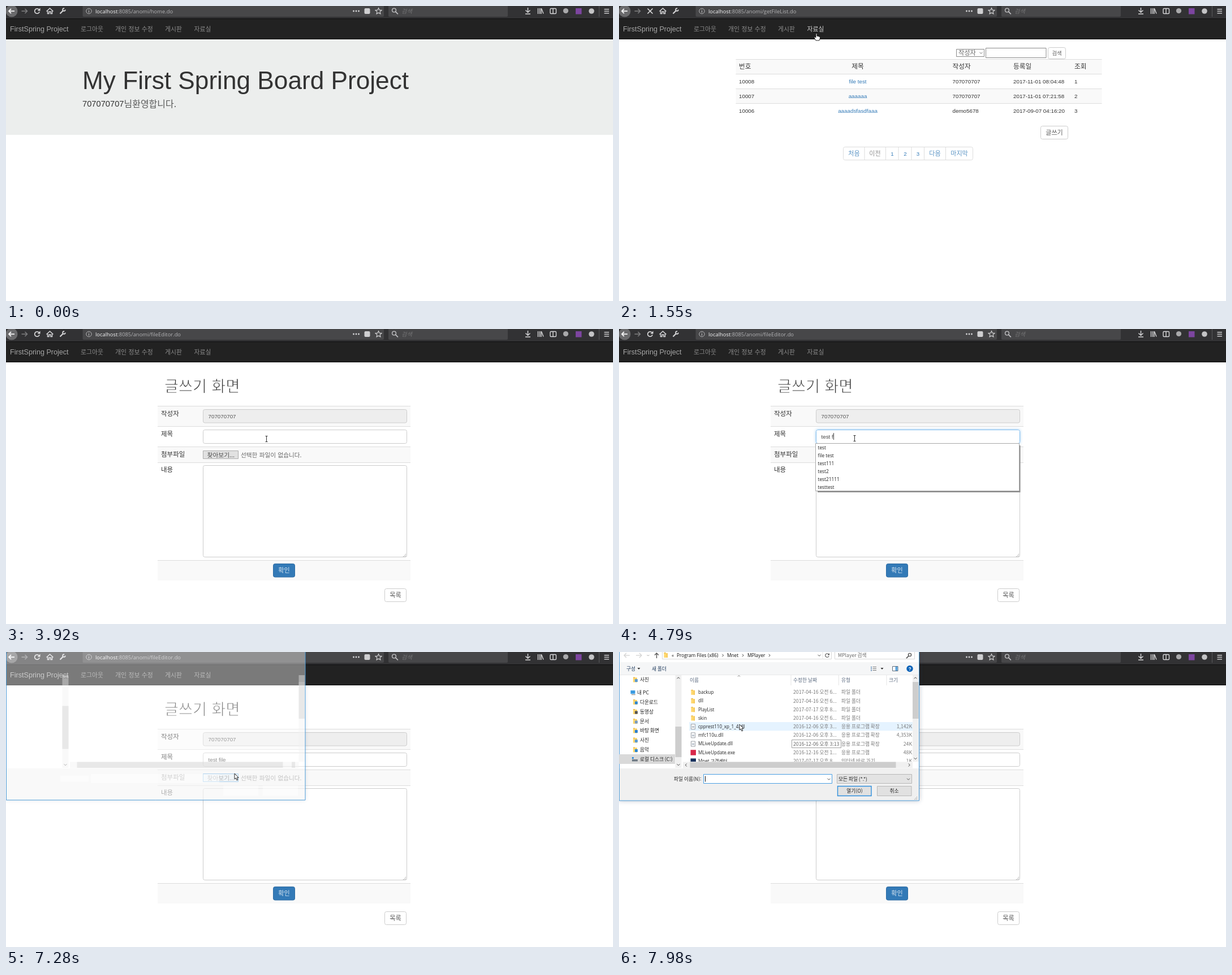
Animation of 1073 by 522 pixels, one loop 8 s. Source, as an HTML page with a canvas:

```html
<!DOCTYPE html>
<html lang="ko">
<head>
<meta charset="utf-8">
<title>Board demo</title>
<style>
html, body { margin: 0; width: 100%; height: 100%; overflow: hidden; background: #fff; }
canvas { display: block; }
</style>
</head>
<body>
<canvas id="stage" width="1073" height="522"></canvas>
<script>
const ctx = document.getElementById('stage').getContext('2d');
const LOOP = 8000;
const SANS = '"Liberation Sans", Arial, sans-serif';
const UI = '"Open Sans", "Noto Sans", sans-serif';
const KO = '"Noto Sans CJK KR", "Noto Sans CJK", sans-serif';
const USER = '707070707';

// y is the middle of the capital letters
function text(s, x, y, size, color, { font = SANS, weight = 400, align = 'left', style = 'normal' } = {}) {
  ctx.font = `${style} ${weight} ${size}px ${font}`;
  ctx.textAlign = align;
  ctx.fillStyle = color;
  ctx.fillText(s, x, Math.round(y + size * 0.36));
  return ctx.measureText(s).width;
}

// pitch is the advance of one Hangul syllable; thin is the background that trims the strokes
function ko(s, x, y, pitch, color, { thin, ...opt } = {}) {
  const size = pitch / 0.92;
  ctx.save();
  ctx.wordSpacing = pitch * 0.1 + 'px';
  if (!opt.weight && !thin) ctx.globalAlpha *= 0.8;
  text(s, x, y, size, color, { font: KO, weight: 300, ...opt });
  if (thin) {
    ctx.strokeStyle = thin;
    ctx.lineWidth = size * 0.03;
    ctx.strokeText(s, x, Math.round(y + size * 0.36));
  }
  ctx.restore();
}

const dlgText = (s, x, y, color = '#222', align = 'left') =>
  text(s, x, y, 8.7, color, { font: KO, align });

function rect(x, y, w, h, color) {
  ctx.fillStyle = color;
  ctx.fillRect(x, y, w, h);
}

function box(x, y, w, h, fill, stroke, r = 0, lw = 1) {
  ctx.beginPath();
  ctx.roundRect(x, y, w, h, r);
  if (fill) { ctx.fillStyle = fill; ctx.fill(); }
  if (stroke) { ctx.strokeStyle = stroke; ctx.lineWidth = lw; ctx.stroke(); }
}

function disc(x, y, r, color) {
  ctx.beginPath();
  ctx.arc(x, y, r, 0, 7);
  ctx.fillStyle = color;
  ctx.fill();
}

function ring(x, y, r, color, lw = 1.3, from = 0, to = Math.PI * 2) {
  ctx.beginPath();
  ctx.arc(x, y, r, from, to);
  ctx.strokeStyle = color;
  ctx.lineWidth = lw;
  ctx.stroke();
}

function line(color, lw, ...pts) {
  ctx.beginPath();
  for (let i = 0; i < pts.length; i += 2) ctx.lineTo(pts[i], pts[i + 1]);
  ctx.strokeStyle = color;
  ctx.lineWidth = lw;
  ctx.stroke();
}

function poly(fill, ...pts) {
  ctx.beginPath();
  for (let i = 0; i < pts.length; i += 2) ctx.lineTo(pts[i], pts[i + 1]);
  ctx.closePath();
  ctx.fillStyle = fill;
  ctx.fill();
}

const chevron = (x, y, d, color, s = 2.5) =>
  line(color, 1, x - s, y - d * s / 2, x, y + d * s / 2, x + s, y - d * s / 2);
const sideChevron = (x, y, d, color, s = 2.5) =>
  line(color, 1, x - d * s / 2, y - s, x + d * s / 2, y, x - d * s / 2, y + s);

function arrow(x, y, d, color, lw = 1.6) {
  line(color, lw, x - 5 * d, y, x + 5 * d, y);
  line(color, lw, x + d, y - 4, x + 5 * d, y, x + d, y + 4);
}

function lens(x, y, r, color, d = 1) {
  ring(x, y, r, color, 1.4);
  line(color, 1.6, x + d * r * 0.7, y + r * 0.7, x + d * (r + 3.5), y + r + 3.5);
}

function loadIcon(t) {
  const c = '#dededf';
  const half = (t >= 1080 && t < 1150) || (t >= 2990 && t < 3150);
  const cross = (t >= 1150 && t < 1780) || (t >= 3150 && t < 3690);
  if (half) return line(c, 1.3, 51, 5, 59, 13);
  if (cross) {
    line(c, 1.6, 50.5, 4.5, 59.5, 13.5);
    line(c, 1.6, 59.5, 4.5, 50.5, 13.5);
    return;
  }
  ring(55, 9, 4.3, c, 1.6, 0.3, 5.5);
  poly(c, 60.5, 3.5, 60.5, 8.5, 55.5, 8.5);
}

function browserBar(t) {
  const c = '#d7d7d9';
  rect(0, 0, 1073, 23, '#323234');
  rect(0, 22, 1073, 1, '#0f0f10');
  box(135.5, -4, 532.5, 23, '#474749', null, 2);
  box(676, -4, 211, 23, '#474749', null, 2);

  disc(10, 9, 10.5, '#6a6a6c');
  arrow(10, 9, -1, '#f2f2f3', 1.8);
  arrow(32.5, 9, 1, '#7c7c7e');
  loadIcon(t);
  line(c, 1.6, 71.5, 9.5, 77.5, 4, 83.5, 9.5);
  line(c, 1.5, 73.5, 8.5, 73.5, 13.5, 76, 13.5, 76, 10, 79, 10, 79, 13.5, 81.5, 13.5, 81.5, 8.5);
  line(c, 2.2, 95.5, 13.5, 101, 8);
  ring(102.5, 6.5, 2.3, c, 1.8, 0, 5);

  ring(146.5, 9, 4.7, '#b6b6b8', 1);
  rect(146, 8, 1, 4, '#c4c4c6');
  rect(146, 6, 1, 1, '#c4c4c6');
  const page = t < 1230 ? 'home' : t < 2920 ? 'getFileList' : 'fileEditor';
  const w = text('localhost', 158, 9.5, 9.4, '#f6f6f7', { font: UI });
  text(`:8085/anomi/${page}.do`, 158 + w, 9.5, 9.4, '#b3b3b5', { font: UI });

  for (const x of [614.5, 619, 623.5]) disc(x, 9, 1.4, c);
  box(633.5, 4, 10, 10, '#cfcfd1', null, 2);
  ctx.beginPath();
  for (let i = 0; i < 10; i++) {
    const a = -Math.PI / 2 + i * Math.PI / 5, r = i % 2 ? 2.7 : 5.8;
    ctx.lineTo(658.5 + r * Math.cos(a), 9.3 + r * Math.sin(a));
  }
  ctx.closePath();
  ctx.strokeStyle = c;
  ctx.lineWidth = 1.1;
  ctx.stroke();
  lens(686, 7.5, 3.4, '#c2c2c4');
  ko('검색', 699, 9.5, 9.4, '#7f7f81', { style: 'italic' });

  line(c, 1.5, 922.5, 3, 922.5, 11);
  line(c, 1.5, 918.5, 7.5, 922.5, 11.3, 926.5, 7.5);
  line(c, 1.5, 918, 14, 927, 14);
  for (const x of [940.5, 943.5, 946]) line(c, 1.4, x, 4, x, 14);
  line(c, 1.4, 946.5, 4.5, 950, 13.5);
  box(962, 4.5, 10.5, 9, null, c, 1.5, 1.4);
  line(c, 1.4, 967, 5, 967, 13);
  disc(989.5, 8.5, 4.6, '#a9a9ab');
  rect(1007, 4, 10.5, 10.5, '#7d45a0');
  disc(1035, 9, 4.8, '#c4c4c6');
  rect(1048, 0, 1, 19, '#59595b');
  for (const y of [5, 8.5, 12]) rect(1057.5, y, 8.5, 1.4, c);
}

function navbar(t) {
  rect(0, 23, 1073, 36, '#222');
  rect(0, 58, 1073, 1, '#0a0a0a');
  const c = '#a6a6a6';
  text('FirstSpring Project', 7, 40.8, 12.6, '#a6a6a6');
  ko('로그아웃', 132, 41, 10, c);
  ko('개인 정보 수정', 193, 41, 10, c);
  ko('게시판', 281, 41, 10, c);
  ko('자료실', 332.5, 41, 10, t >= 720 && t < 1660 ? '#fff' : c);
}

function home() {
  rect(0, 59, 1073, 169, '#eceeed');
  text('My First Spring Board Project', 135, 131.3, 44.2, '#333');
  const w = text(USER, 135, 173, 14.7, '#333');
  ko('님환영합니다.', 135 + w, 173, 14.7, '#333');
}

function button(s, x, y, w, h, pitch, fill = '#fff', border = '#ccc', color = '#333') {
  box(x, y, w, h, fill, border, 3);
  ko(s, x + w / 2, y + h / 2, pitch, color, { align: 'center' });
}

function list(t) {
  const blue = '#337ab7', dark = '#333';
  box(596.5, 76.5, 49, 13, '#fff', '#8a8a8a');
  ko('작성자', 600, 83, 10.3, '#444');
  chevron(640, 83, 1, '#777');
  box(648.5, 74.5, 106.5, 17, '#fff', '#8a8a8a');
  button('검색', 758.5, 73.5, 31, 20, 8.6);

  rect(206.5, 95, 647, 26, '#f9f9f9');
  rect(206.5, 147, 647, 26, '#f9f9f9');
  for (let i = 0; i < 4; i++) rect(206.5, 94 + 26 * i, 647, 1, '#ddd');
  const head = { weight: 500 };
  ko('번호', 212, 107, 10.7, dark, head);
  ko('제목', 422, 107, 10.7, dark, { ...head, align: 'center' });
  ko('작성자', 589.5, 107, 10.7, dark, head);
  ko('등록일', 697, 107, 10.7, dark, head);
  ko('조회', 805, 107, 10.7, dark, head);
  const rows = [
    ['10008', 'file test', USER, '2017-11-01 08:04:48', '1'],
    ['10007', 'aaaaaa', USER, '2017-11-01 07:21:58', '2'],
    ['10006', 'aaaadsfasdfaaa', 'demo5678', '2017-09-07 04:16:20', '3']
  ];
  const over = t >= 2080 && t < 2260;
  rows.forEach(([id, title, user, date, hits], i) => {
    const y = 133 + 26 * i, lit = over && i === 0;
    text(id, 212, y, 9.8, dark);
    const w = text(title, 422, y, 9.8, lit ? '#23527c' : blue, { align: 'center' });
    if (lit) rect(422 - w / 2, y + 5, w, 1, '#23527c');
    text(user, 589.5, y, 9.8, dark);
    text(date, 697, y, 9.8, dark);
    text(hits, 805, y, 9.8, dark);
  });

  const held = t >= 2610 && t < 2690, hot = t >= 2420;
  button('글쓰기', 745.5, 212.5, 48, 23, 10.2,
    held ? '#d4d4d4' : hot ? '#e6e6e6' : '#fff', hot ? '#adadad' : '#ccc');

  box(396.5, 249.5, 229, 23, '#fff', '#ddd', 3);
  for (const x of [433.5, 471, 493.5, 516.5, 539, 577]) rect(x, 250, 1, 23, '#ddd');
  const mid = { align: 'center' };
  ko('처음', 415.5, 261.5, 10.2, blue, mid);
  ko('이전', 452.5, 261.5, 10.2, '#777', mid);
  [483, 506, 528.5].forEach((x, i) => text(String(i + 1), x, 261.5, 9.8, blue, mid));
  ko('다음', 558.5, 261.5, 10.2, blue, mid);
  ko('마지막', 601.5, 261.5, 10.2, blue, mid);
}

const keyTimes = [4150, 4230, 4310, 4390, 4540, 4790, 5400, 5720, 5780];

function field(t) {
  const focus = t >= 4000 && t < 6800;
  if (focus) {
    ctx.save();
    ctx.shadowColor = 'rgba(102,175,233,.6)';
    ctx.shadowBlur = 5;
    box(348, 178, 361, 24.5, '#fff', null, 3);
    ctx.restore();
  }
  box(348.5, 178.5, 360, 24, '#fff', focus ? '#7fbcee' : '#ccc', 3);
  const typed = 'test file'.slice(0, keyTimes.filter(k => t >= k).length);
  const w = text(typed, 357.5, 190, 9.8, '#444');
  const blink = t >= 5940 && t < 6320;
  if (focus && !blink) rect(Math.round(357.5 + w), 184, 1, 12, '#444');
}

function suggestions(t) {
  if (t < 4230 || t >= 6330) return;
  const all = ['test', 'file test', 'test111', 'test2', 'test21111', 'testtest'];
  const items = t < 4870 ? all : ['file test'];
  const h = items.length * 14 + 1;
  rect(351, 206, 358.5, h - 2, '#8c8c8c');
  box(347.5, 202.5, 360, h - 1, '#fff', '#a8a8a8');
  items.forEach((s, i) => text(s, 351.5, 210.5 + 14 * i, 8.3, '#222', { font: UI }));
}

function editor(t) {
  const dark = '#333', label = { weight: 500 };
  ko('글쓰기 화면', 280, 101, 25, dark, { thin: '#fff' });
  for (const [y, h] of [[137, 35], [208, 28], [409, 36]]) rect(268, y, 447, h, '#f9f9f9');
  for (const y of [136, 172, 208, 236, 409]) rect(268, y, 447, 1, '#ddd');
  ko('작성자', 274, 150, 10.6, dark, label);
  ko('제목', 274, 186, 10.6, dark, label);
  ko('첨부파일', 274, 221.5, 10.6, dark, label);
  ko('내용', 274, 249, 10.6, dark, label);
  box(348.5, 142.5, 360, 23.5, '#eee', '#ccc', 3);
  text(USER, 357.5, 154.5, 9.8, '#555');
  field(t);
  const hot = t >= 6470;
  box(348.5, 215.5, 62, 14, hot ? '#e5f1fb' : '#e1e1e1', hot ? '#2f8fdd' : '#adadad');
  ko('찾아보기...', 355.5, 223, 9.9, '#222');
  ko('선택한 파일이 없습니다.', 415, 223, 9.8, '#444');
  box(348.5, 241.5, 360, 162, '#fff', '#ccc', 3);
  grip(707, 402);
  button('확인', 472.5, 415.5, 38, 23.5, 10.2, '#337ab7', '#2e6da4', '#fff');
  button('목록', 669.5, 459.5, 38, 23, 10.2);
  suggestions(t);
}

function grip(x, y) {
  for (let i = 0; i < 3; i++)
    for (let j = 0; j <= i; j++) rect(x - 5 + i * 2, y - j * 2, 1, 1, '#999');
}

function dialogFrame(w, h, alpha) {
  ctx.save();
  ctx.globalAlpha = alpha;
  ctx.save();
  ctx.beginPath();
  ctx.rect(0, 0, 1073, 522);
  ctx.rect(0, 0, w, h);
  ctx.clip('evenodd');
  ctx.shadowColor = 'rgba(20,40,80,.3)';
  ctx.shadowBlur = 8;
  rect(0, 0, w, h, '#fff');
  ctx.restore();
  rect(0, 0, w, h, '#fff');
  rect(0, 206, w, h - 206, '#f0f0f0');
  ctx.restore();
  box(0.5, -2, w - 0.5, h + 2, null, '#4f9dd8');
}

function scrollBars(sideY, sideH, shift) {
  rect(99.5, 41, 11, 164, '#f0f0f0');
  rect(99.5, sideY, 11, sideH, '#cdcdcd');
  chevron(105, 46, -1, '#444');
  chevron(105, 199.5, 1, '#444');
  rect(519 - shift, 41, 10.5, 153, '#f0f0f0');
  rect(519 - shift, 53, 10.5, 65, '#cdcdcd');
  rect(113, 194.5, 406 - shift, 11, '#f0f0f0');
  rect(125.5, 194.5, 364, 10.5, '#cdcdcd');
}

function blankDialog(alpha) {
  dialogFrame(529, 262, alpha);
  ctx.save();
  ctx.globalAlpha = alpha;
  scrollBars(95.5, 76, 1.5);
  rect(505, 194.5, 6, 10.5, '#cdcdcd');
  for (const [x, y, w, h] of [[96, 218.5, 50, 11], [150, 216, 227, 16], [384, 236.5, 62, 18], [454, 236.5, 62, 18]])
    rect(x, y, w, h, '#fff');
  ctx.restore();
}

function folder(x, y) {
  rect(x - 3, y - 4.5, 3.5, 2, '#e3b23f');
  rect(x - 3, y - 3.5, 6.5, 8, '#ffd76e');
  rect(x + 2, y - 3.5, 1.5, 8, '#f2c14e');
}

function sheet(x, y, mark) {
  box(x - 3.5, y - 4.5, 7, 9, '#fff', '#8f959c', 0, 0.9);
  rect(x - 2, y - 1, 4, 3, mark);
}

function sidePane() {
  rect(0, 181, 99, 17, '#d9d9d9');
  const items = [['사진', 49], ['다운로드', 88.5], ['동영상', 105.5], ['문서', 122.5],
    ['바탕 화면', 139], ['사진', 156], ['음악', 173]];
  const tint = ['#5c9bd1', '#2f87d0', '#555', '#7a9cc0', '#2c7fd0', '#5c9bd1', '#2f87d0'];
  items.forEach(([s, y], i) => {
    folder(28, y);
    rect(28, y - 1, 5, 5, tint[i]);
    dlgText(s, 37, y);
  });
  rect(20.5, 68, 8, 6, '#3b9be0');
  rect(22, 75, 7, 1, '#777');
  dlgText('내 PC', 32, 72);
  rect(23, 190, 10, 3.5, '#6f7a84');
  rect(23, 186, 3, 3, '#2a8ad8');
  dlgText('로컬 디스크 (C:)', 37, 190);
}

function fileRows() {
  const gray = '#7a7a7a', lib = '응용 프로그램 확장', dir = '파일 폴더';
  const files = [
    ['backup', '2017-04-16 오전 6...', dir],
    ['dll', '2017-04-16 오전 6...', dir],
    ['PlayList', '2017-07-17 오후 8...', dir],
    ['skin', '2017-04-16 오전 6...', dir],
    ['cpprest110_xp_1_4.dll', '2016-12-06 오후 3...', lib, '1,142K'],
    ['mfc110u.dll', '2016-12-06 오후 3...', lib, '4,353K'],
    ['MLiveUpdate.dll', '2016-12-06 오후 3...', lib, '24K'],
    ['MLiveUpdate.exe', '2016-12-16 오전 1...', '응용 프로그램', '48K'],
    ['Mnet 고객센터', '2017-07-17 오후 8...', '인터넷 바로 가기', '1K']
  ];
  ctx.save();
  ctx.beginPath();
  ctx.rect(113, 60, 406, 134);
  ctx.clip();
  files.forEach(([name, date, kind, size], i) => {
    const y = 71.3 + 15.2 * i;
    if (i < 4) folder(130.5, y);
    else if (i < 7) sheet(131, y, '#b9c2cc');
    else rect(126.5, y - 4.5, 9.5, 9.5, i === 7 ? '#d8284a' : '#17305c');
    text(name, 140, y, 8.1, '#222', { font: `"Open Sans", ${KO}` });
    dlgText(date, 308, y, gray);
    dlgText(kind, 393, y, gray);
    if (size) dlgText(size, 518, y, gray, 'right');
  });
  ctx.restore();
}

function dialog(t) {
  const gray = '#5c6b80';
  dialogFrame(530.5, 263, 1);
  arrow(14, 6, -1, '#d0d0d0', 1.2);
  arrow(35, 6, 1, '#d0d0d0', 1.2);
  chevron(51.5, 6, 1, '#aaa', 2);
  line('#555', 1.4, 66.5, 11, 66.5, 2);
  line('#555', 1.4, 63, 5.5, 66.5, 2, 70, 5.5);
  box(76.5, -4, 299, 16.5, '#fff', '#d9d9d9');
  rect(359.5, 0, 1, 13, '#e5e5e5');
  folder(82.5, 5.5);
  text('«', 93, 6, 8.3, '#333', { font: UI });
  text('Program Files (x86)', 102, 6, 8.3, '#111', { font: UI });
  text('Mnet', 191, 6, 8.3, '#111', { font: UI });
  text('MPlayer', 227, 6, 8.3, '#111', { font: UI });
  for (const x of [183.5, 219, 266]) sideChevron(x, 6, 1, '#444', 2.3);
  chevron(354, 6, 1, '#555');
  ring(368, 6, 3.3, '#555', 1.1, 0.4, 5.6);
  poly('#555', 372, 2, 372, 5.5, 368.5, 5.5);
  box(381.5, -4, 141, 16.5, '#fff', '#d9d9d9');
  dlgText('MPlayer 검색', 387, 6, '#666');
  lens(514, 5, 2.6, '#555', -1);

  rect(1, 18, 529, 22.5, '#f5f6f7');
  rect(1, 40, 529, 1, '#e8e9ea');
  dlgText('구성', 13, 29.5, '#1e395b');
  poly('#333', 32.5, 28, 37.5, 28, 35, 31);
  dlgText('새 폴더', 58, 29.5, '#1e395b');
  for (const y of [26, 29, 32]) {
    rect(445, y, 2, 1.5, '#4f7eae');
    rect(448.5, y, 6.5, 1, '#777');
  }
  poly('#333', 462.5, 28, 467.5, 28, 465, 31);
  box(483.5, 25.5, 9.5, 8, '#fff', '#5a6b7d');
  rect(488.5, 26, 4, 7, '#5aa4dc');
  disc(514, 29.5, 5.7, '#0a63b8');
  text('?', 514, 29.5, 8.5, '#fff', { weight: 700, align: 'center' });

  sidePane();
  scrollBars(132, 54, 0);
  chevron(524, 46, -1, '#444');
  chevron(524, 188.5, 1, '#444');
  sideChevron(118.5, 200, -1, '#444');
  sideChevron(513, 200, 1, '#444');
  chevron(212, 42.5, -1, '#777', 2);
  dlgText('이름', 125, 49.5, gray);
  dlgText('수정한 날짜', 308, 49.5, gray);
  dlgText('유형', 393, 49.5, gray);
  dlgText('크기', 477, 49.5, gray);
  for (const x of [303.5, 388, 472.5]) rect(x, 41, 1, 18, '#e5e5e5');
  if (t >= 7750) rect(124, t < 7830 ? 154.5 : 124, 395, 15.3, '#e5f3ff');
  fileRows();
  if (t >= 7830) {
    box(305.5, 155.5, 87, 14, '#fff', '#a0a0a0');
    dlgText('2016-12-06 오후 3:13', 308, 162.5, '#666');
  }

  dlgText('파일 이름(N):', 145.5, 224.5, '#222', 'right');
  box(149.5, 216.5, 227, 16, '#fff', '#4a9fe3');
  rect(152, 219.5, 1, 10, '#111');
  chevron(371, 225, 1, '#555');
  box(385.5, 216.5, 132, 16, '#e3e3e3', '#b8b8b8');
  dlgText('모든 파일 (*.*)', 388, 224.5);
  chevron(511.5, 225, 1, '#555');
  box(386.5, 237.5, 59.5, 17, '#e1e1e1', '#2f8fdd', 0, 1.4);
  dlgText('열기(O)', 416.5, 246, '#222', 'center');
  box(456.5, 237.5, 60.5, 17, '#e1e1e1', '#b8b8b8');
  dlgText('취소', 486.5, 246, '#222', 'center');
  grip(527, 260);
}

// time, x, y
const path = [
  [130, 899, 396], [420, 620, 215], [700, 356, 56], [760, 349, 48], [1620, 349, 48],
  [1900, 385, 95], [2150, 416, 127], [2230, 416, 127], [2440, 762, 221], [3150, 762, 221],
  [3600, 560, 196], [3690, 560, 196], [3920, 416, 193], [6170, 416, 193], [6470, 398, 227],
  [6720, 398, 227], [6860, 404, 215], [7510, 404, 215], [7720, 320, 165], [7890, 213, 128]
];

function pointAt(t) {
  const i = path.findIndex(k => k[0] > t);
  if (i < 0) return path[path.length - 1].slice(1);
  if (i === 0) return path[0].slice(1);
  const [a, x0, y0] = path[i - 1], [b, x1, y1] = path[i];
  const f = (t - a) / (b - a);
  return [x0 + (x1 - x0) * f, y0 + (y1 - y0) * f];
}

function pointer(t) {
  if (t < 130) return;
  const [x, y] = pointAt(Math.floor(t / 77) * 77);
  const within = (a, b) => t >= a && t < b;
  ctx.save();
  ctx.translate(Math.round(x), Math.round(y));
  ctx.lineJoin = 'round';
  if (within(3840, 6330)) {
    line('#333', 1, 0.5, -4, 0.5, 5);
    line('#333', 1, -1.5, -4.5, 2.5, -4.5);
    line('#333', 1, -1.5, 5.5, 2.5, 5.5);
  } else {
    const hand = within(720, 1660) || within(2080, 2260);
    const shape = new Path2D(hand
      ? 'M-1 1Q0-1 1 1V5L5 6Q7 7 6.5 9L5 13H-1L-4 8Q-4 6-2.5 7L-1 8Z'
      : 'M0 0V10L2.3 8L4 12L5.8 11.2L4.2 7.4H7.2Z');
    ctx.fillStyle = '#fff';
    ctx.fill(shape);
    ctx.strokeStyle = '#111';
    ctx.lineWidth = 0.9;
    ctx.stroke(shape);
  }
  ctx.restore();
}

function draw(t) {
  rect(0, 0, 1073, 522, '#fff');
  browserBar(t);
  navbar(t);
  if (t < 1380) home();
  else if (t < 3230) list(t);
  else editor(t);
  if (t >= 7590) dialog(t);
  else if (t >= 7280) blankDialog(t < 7360 ? 0.4 : t < 7430 ? 0.66 : t < 7510 ? 0.84 : 1);
  pointer(t);
}

const start = performance.now();
function tick() {
  draw((performance.now() - start) % LOOP);
  requestAnimationFrame(tick);
}
tick();
</script>
</body>
</html>
```
